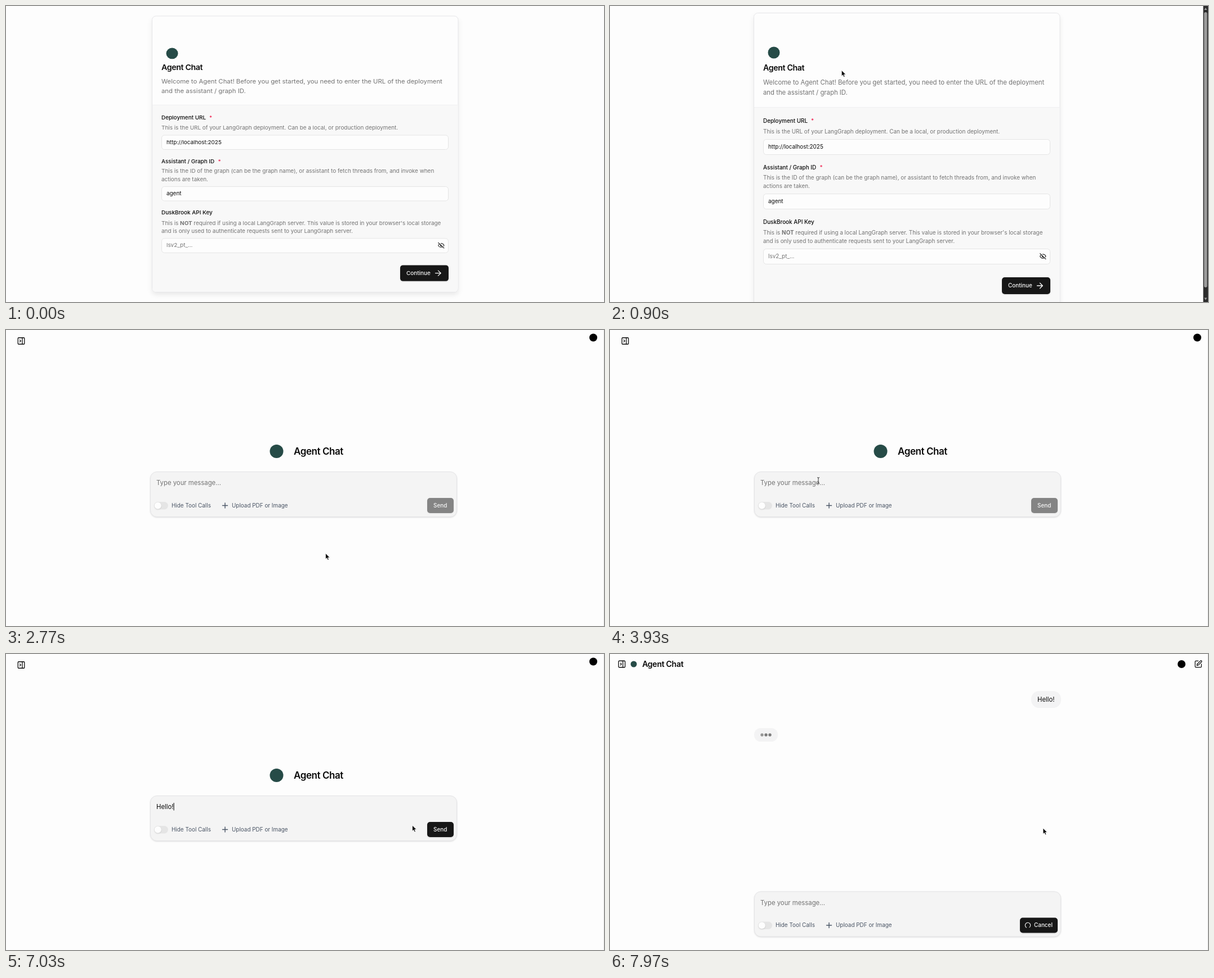
Animation, 1062 px wide and 527 px high, one loop 8000 ms. Source, as an HTML page:

```html
<!DOCTYPE html>
<html lang="en">
<head>
<meta charset="utf-8">
<title>Agent Chat</title>
<style>
  html, body { margin: 0; width: 100%; height: 100%; overflow: hidden; background: #fdfdfd; }
  svg { display: block; }
  text { font: 400 9.92px Inter, sans-serif; fill: #0a0a0a; white-space: pre; }
  .title { font-size: 14.17px; font-weight: 600; letter-spacing: -.025em; }
  .big { font-size: 17px; }
  .body { font-size: 11.33px; }
  .label { font-weight: 500; }
  .muted { fill: #737373; }
  .slate { fill: #4a5565; }
  .star { fill: #f0204f; }
  .light { fill: #fafafa; font-weight: 500; }
  .field { fill: #fdfdfd; stroke: #e5e5e5; }
  .dark { fill: #171717; }
  .logo { fill: #264b47; }
  .icon { fill: none; stroke: #0a0a0a; stroke-width: 2; stroke-linecap: round; stroke-linejoin: round; }
  #card { filter: drop-shadow(0 5px 4px rgba(0, 0, 0, .07)); }
  .lift { filter: drop-shadow(0 1px 1px rgba(0, 0, 0, .12)); }
</style>
</head>
<body>
<svg width="1062" height="527">
  <defs>
    <g id="panel" class="icon">
      <rect x="-9" y="-9" width="18" height="18" rx="2"/>
      <path d="M3-9V9M-4-3l3 3-3 3"/>
    </g>
  </defs>

  <g id="setup">
    <g id="form">
      <g id="card">
        <rect x="255.5" y="12.5" width="543.5" height="521.5" rx="7" fill="#fdfdfd" stroke="#e6e6e8"/>
      </g>
      <path d="M256 181H798.500V527a6.500 6.500 0 0 1-6.500 6.500H262.500a6.500 6.500 0 0 1-6.500-6.500Z" fill="#f8f8f8"/>
      <path d="M256 180.500H798.500" stroke="#efeff1"/>
      <circle class="logo" cx="291" cy="83" r="10.500"/>
      <text class="title" x="272" y="114.500">Agent Chat</text>
      <text class="body muted" x="272" y="139.700">Welcome to Agent Chat! Before you get started, you need to enter the URL of the deployment</text>
      <text class="body muted" x="272" y="157.700">and the assistant / graph ID.</text>

      <text class="label" x="272" y="207.500">Deployment URL</text>
      <text class="label star" x="357" y="208">*</text>
      <text class="muted" x="272" y="227">This is the URL of your LangGraph deployment. Can be a local, or production deployment.</text>
      <rect class="field" x="272.500" y="237.500" width="509" height="27" rx="5"/>
      <text x="281" y="254">http://localhost:2025</text>

      <text class="label" x="272" y="290.500">Assistant / Graph ID</text>
      <text class="label star" x="372.500" y="291">*</text>
      <text class="muted" x="272" y="309">This is the ID of the graph (can be the graph name), or assistant to fetch threads from, and invoke when</text>
      <text class="muted" x="272" y="324">actions are taken.</text>
      <rect class="field" x="272.500" y="334.500" width="509" height="27" rx="5"/>
      <text x="281" y="351.200">agent</text>

      <text class="label" x="272" y="387.500">DuskBrook API Key</text>
      <text class="muted" x="272" y="407">This is <tspan font-weight="700">NOT</tspan> required if using a local LangGraph server. This value is stored in your browser's local storage</text>
      <text class="muted" x="272" y="422">and is only used to authenticate requests sent to your LangGraph server.</text>
      <rect class="field" x="272.500" y="432.500" width="509" height="27" rx="5"/>
      <text class="muted" x="281" y="449">lsv2_pt_...</text>
      <g class="icon" transform="translate(762.700 439.500) scale(.51)">
        <path d="M10.733 5.076a10.744 10.744 0 0 1 11.205 6.575 1 1 0 0 1 0 .696 10.747 10.747 0 0 1-1.444 2.490M14.084 14.158a3 3 0 0 1-4.242-4.242M17.479 17.499a10.750 10.750 0 0 1-15.417-5.151 1 1 0 0 1 0-.696 10.750 10.750 0 0 1 4.446-5.143M2 2l20 20"/>
      </g>

      <rect id="continue" class="dark lift" x="696" y="483" width="86" height="30" rx="5"/>
      <text class="light" x="707" y="501.200">Continue</text>
      <path d="M758.500 498h9.500M763.500 493.200l4.800 4.800-4.800 4.800" class="icon" style="stroke:#fafafa;stroke-width:1.300"/>
    </g>
    <g id="scrollbar">
      <rect x="1053.500" width="8.500" height="527" fill="#2c2c2c"/>
      <rect x="1055" y="11" width="5.500" height="490" rx="2.700" fill="#9c9c9c"/>
      <path d="M1055.300 7l2.500-4 2.500 4ZM1055.300 519.500l2.500 4 2.500-4Z" fill="#9c9c9c"/>
    </g>
  </g>

  <g id="chat">
    <path d="M1061.500 0V527" stroke="#ececec"/>

    <g id="welcome">
      <use href="#panel" transform="translate(27 19.500) scale(.64)"/>
      <circle cx="1043" cy="13.500" r="7"/>
      <circle class="logo" cx="480.500" cy="216" r="12"/>
      <text class="title big" x="511" y="221.500">Agent Chat</text>
    </g>

    <g id="thread">
      <use href="#panel" transform="translate(21 18) scale(.64)"/>
      <g id="brand">
        <circle class="logo" cx="42" cy="18" r="5.500"/>
        <text class="title" x="57" y="23">Agent Chat</text>
      </g>
      <circle cx="1015" cy="18" r="7"/>
      <g class="icon" transform="translate(1037.300 10.500) scale(.62)">
        <path d="M12 3H5a2 2 0 0 0-2 2v14a2 2 0 0 0 2 2h14a2 2 0 0 0 2-2v-7M18.375 2.625a1 1 0 0 1 3 3l-9.013 9.014a2 2 0 0 1-.853.505l-2.873.840a.5.5 0 0 1-.620-.620l.840-2.873a2 2 0 0 1 .506-.852z"/>
      </g>
      <rect x="748" y="66" width="53" height="30" rx="14" fill="#f3f3f4"/>
      <text class="body" x="759" y="85">Hello!</text>
      <rect x="256" y="132" width="42" height="24" rx="11.500" fill="#f3f3f4"/>
      <g id="dots" fill="#7c7c7c">
        <circle cx="270" cy="144" r="2.700"/>
        <circle cx="277" cy="144" r="2.700"/>
        <circle cx="284" cy="144" r="2.700"/>
      </g>
    </g>

    <g id="composer">
      <rect class="lift" x="256.500" y="252.500" width="544" height="80" rx="11.500" fill="#f4f4f4" stroke="#e4e4e6"/>
      <text id="hint" class="body muted" x="267" y="276">Type your message...</text>
      <text id="draft" class="body" x="267" y="276"></text>
      <rect id="caret" y="265" width="1" height="13.500"/>
      <rect x="263" y="306" width="25" height="13.500" rx="6.700" fill="#e5e5e5"/>
      <circle class="lift" cx="269.700" cy="312.700" r="6" fill="#fdfdfd"/>
      <text class="slate" x="294" y="315.800">Hide Tool Calls</text>
      <path d="M384.500 312.500h9M389 308v9" class="icon" style="stroke:#4a5565;stroke-width:1.400"/>
      <text class="slate" x="401" y="315.800">Upload PDF or Image</text>
      <g id="send">
        <rect class="dark lift" x="748" y="299" width="47" height="27" rx="5"/>
        <text class="light" x="759" y="315.800">Send</text>
      </g>
      <g id="cancel">
        <rect class="dark lift" x="728" y="299" width="67" height="27" rx="5"/>
        <path id="spinner" d="M4.700 0A4.700 4.700 0 1 1 1.450-4.470" class="icon" style="stroke:#fafafa;stroke-width:1.100"/>
        <text class="light" x="753" y="315.800">Cancel</text>
      </g>
    </g>
  </g>

  <g id="cursor">
    <path id="arrow" d="M0 0V10.500l2.400-2.200 1.600 3.700 1.900-.8-1.600-3.600h3.300Z" fill="#0a0a0a" stroke="#fff" stroke-width=".8"/>
    <path id="beam" d="M-2-5.500q2 0 2 1.500V4q0 1.500-2 1.500M2-5.500q-2 0-2 1.500M2 5.500q-2 0-2-1.500" fill="none" stroke="#333"/>
  </g>
</svg>

<script>
const LOOP = 8000, OPEN = 2470, FOCUS = 3330, SENT = 7630;
const el = id => document.getElementById(id);
const show = (id, on) => { el(id).style.display = on ? "" : "none"; };
const place = (id, value) => el(id).setAttribute("transform", value);
const clamp = v => Math.min(1, Math.max(0, v));
const progress = (t, from, to) => clamp((t - from) / (to - from));
const smooth = p => p * p * (3 - 2 * p);

// [time, text in the box]
const keys = [[FOCUS, ""], [4170, "H"], [4400, "He"], [4600, "Hel"],
  [5400, "Hell"], [5530, "Hello"], [5730, "Hello!"]];

// [time, x, y] of the pointer
const route = [[670, 395, -14], [900, 411, 114], [1470, 528, 368], [2170, 719, 497],
  [OPEN, 719, 497], [3130, 370, 268], [6670, 370, 268], [7130, 769, 310], [LOOP, 769, 310]];

function hover(t, from) {
  const v = 23 + 23 * progress(t, from, from + 150);
  return `rgb(${v},${v},${v})`;
}

function drawSetup(t) {
  // the viewport loses height while its picture keeps filling the stage
  const height = 559 - 32 * smooth(progress(t, 70, 300));
  const scrolls = height < 546;
  const top = Math.max(12, (height - 522) / 2);
  const k = 527 / height;
  place("form", `translate(${scrolls ? 0 : 4} ${k * (top - 12)}) scale(1 ${k})`);
  show("scrollbar", scrolls);
  el("continue").style.fill = hover(t, 2020);
}

function drawComposer(t, sent) {
  const [since, typed] = keys.filter(k => k[0] <= t).pop() || [Infinity, ""];
  const draft = sent ? "" : typed;
  el("draft").textContent = draft;
  show("hint", !draft);
  show("caret", !sent && t >= since && (t - since) % 1200 < 600);
  el("caret").setAttribute("x", 267 + (draft ? el("draft").getComputedTextLength() : 0));
  show("send", !sent);
  show("cancel", sent);
  el("send").style.opacity = .5 + .5 * progress(t, 4170, 4320);
  el("send").firstElementChild.style.fill = hover(t, 7060);
  place("composer", `translate(0 ${sent ? 170.5 : 0})`);
}

function drawThread(t) {
  const s = (t - SENT) / 1000;
  const spring = Math.exp(-15 * s) * (Math.cos(8.66 * s) + 1.73 * Math.sin(8.66 * s));
  place("brand", `translate(${-34 * spring} 0)`);
  place("spinner", `translate(742 312.5) rotate(${360 * s})`);
  [...el("dots").children].forEach((dot, i) => {
    const phase = Math.max(0, s - i / 2) / 1.5;
    dot.style.opacity = .75 + .25 * Math.cos(2 * Math.PI * phase);
  });
}

function drawCursor(t) {
  const visible = t >= 670 && !(t >= 4170 && t < 6670);
  show("cursor", visible);
  if (!visible) return;
  const next = route.findIndex(p => p[0] > t);
  const [t0, x0, y0] = route[next - 1], [t1, x1, y1] = route[next];
  const linear = progress(t, t0, t1);
  const p = t1 < 2000 ? linear : smooth(linear);
  const x = x0 + (x1 - x0) * p, y = y0 + (y1 - y0) * p;
  const inText = t >= OPEN && t < SENT && x > 263 && x < 795 && y > 256 && y < 295;
  show("arrow", !inText);
  show("beam", inText);
  place("cursor", `translate(${x} ${y})`);
}

function draw(t) {
  const open = t >= OPEN, sent = t >= SENT;
  show("setup", !open);
  show("chat", open);
  show("welcome", !sent);
  show("thread", sent);
  if (open) drawComposer(t, sent);
  else drawSetup(t);
  if (sent) drawThread(t);
  drawCursor(t);
}

const start = performance.now();
function tick() {
  draw((performance.now() - start) % LOOP);
  requestAnimationFrame(tick);
}
tick();
</script>
</body>
</html>
```
